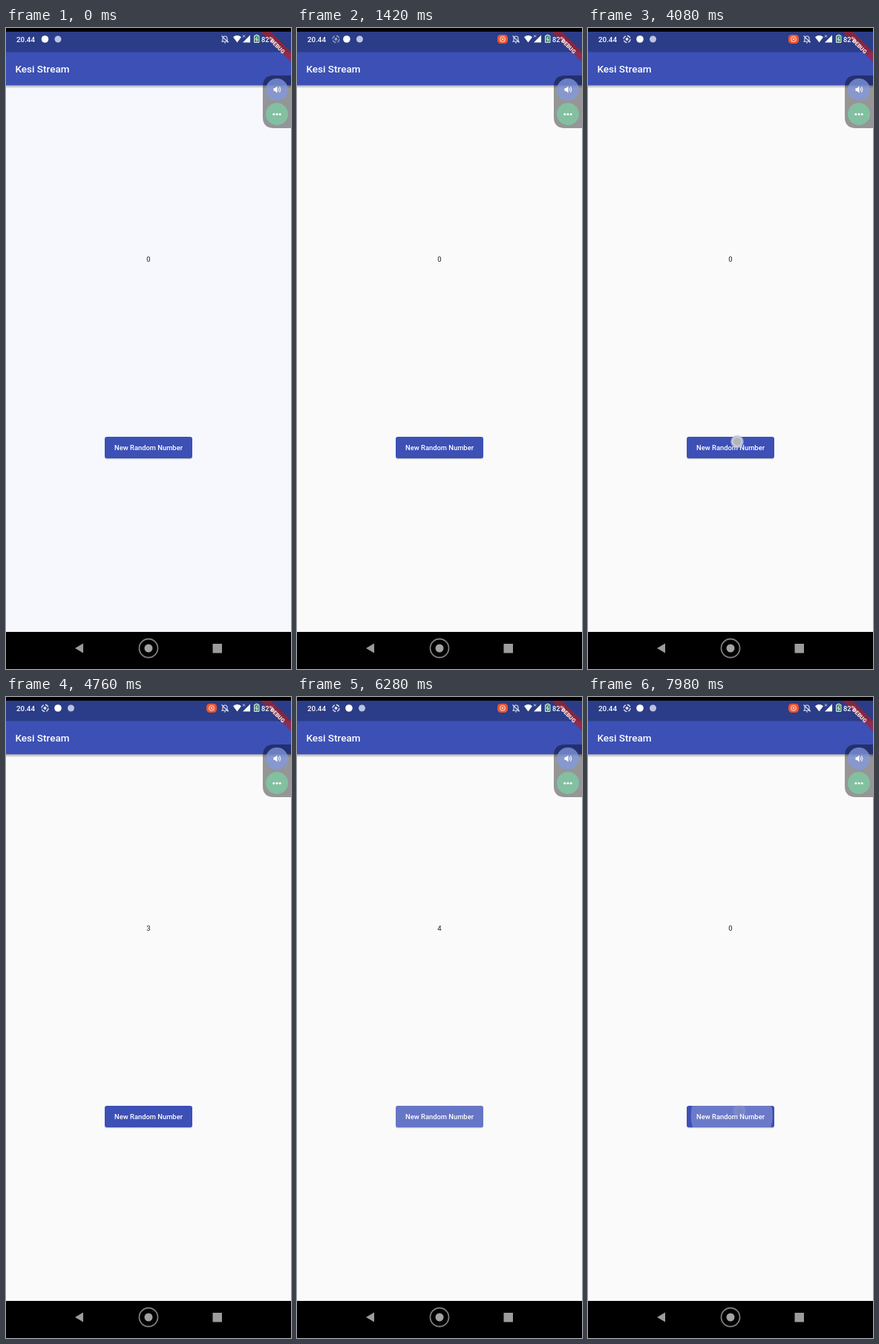
An HTML page that plays this animation: 384x864 px, repeating every 8000 ms.

```html
<!DOCTYPE html>
<html lang="en">
<head>
<meta charset="utf-8">
<title>Random number stream</title>
<style>
  html, body { margin: 0; width: 100%; height: 100%; overflow: hidden; background: #000; }
  svg { display: block; width: 384px; height: 864px; }
  text { font-family: Roboto, sans-serif; font-weight: 500; fill: #fff; }
  .mid { text-anchor: middle; }
</style>
</head>
<body>
<svg viewBox="0 0 384 864">
  <defs>
    <clipPath id="buttonShape"><rect x="133" y="551" width="118" height="29" rx="3"/></clipPath>
    <clipPath id="app"><rect y="5" width="384" height="809"/></clipPath>
    <linearGradient id="shade" x2="0" y2="1">
      <stop stop-opacity=".32"/>
      <stop offset="1" stop-opacity="0"/>
    </linearGradient>
    <radialGradient id="glow">
      <stop offset=".45" stop-color="#b4b5ba"/>
      <stop offset=".75" stop-color="#c9cfdc"/>
      <stop offset="1" stop-color="#aab6d8" stop-opacity=".5"/>
    </radialGradient>
  </defs>

  <rect width="384" height="864"/>
  <rect id="page" y="77" width="384" height="737"/>
  <rect y="77" width="384" height="4.5" fill="url(#shade)"/>
  <rect y="5" width="384" height="28" fill="#2b3d89"/>
  <rect y="32.5" width="384" height="44.7" fill="#3c50b6"/>
  <text x="12.5" y="60" font-size="13.5">Kesi Stream</text>

  <text id="number" class="mid" x="192" y="315" font-size="9.5" style="font-weight:400;fill:#222"></text>

  <rect x="133" y="552.3" width="118" height="29" rx="3" opacity=".2"/>
  <g clip-path="url(#buttonShape)">
    <rect x="133" y="551" width="118" height="29" fill="#3c50b6"/>
    <circle id="ripple" fill="#fff"/>
  </g>
  <text class="mid" x="192" y="569" font-size="9.4">New Random Number</text>
  <circle id="touch" cy="557.5" r="9" fill="url(#glow)"/>

  <g clip-path="url(#app)">
    <path d="M343 5H357L384 32V46Z" fill="#b71c1c" opacity=".63"/>
    <text class="mid" transform="translate(364 26.5) rotate(45)" font-size="7.6" style="font-weight:900;fill:#f4e6e2">DEBUG</text>
  </g>

  <!-- status bar -->
  <text x="14" y="19" font-size="9.8">20.44</text>
  <g id="recorder" fill="none" stroke="#e0e3ee">
    <circle cx="52.5" cy="15" r="4.5" stroke-width="1.3" stroke-dasharray="5 2"/>
    <circle cx="52.5" cy="15" r="2" fill="#e0e3ee" stroke="none"/>
  </g>
  <g id="notices">
    <circle cx="52.5" cy="15" r="4.8" fill="#fff"/>
    <circle cx="70" cy="15" r="4.5" fill="#bcc3e2"/>
  </g>
  <g id="chip">
    <rect x="270" y="9" width="14" height="12" rx="4.5" fill="#ec5532"/>
    <circle cx="277" cy="15" r="3.3" fill="none" stroke="#ffd9cc" stroke-width="1.1"/>
    <circle cx="277" cy="15" r="1.3" fill="#ffd9cc"/>
  </g>
  <g fill="none" stroke="#dfe3f0" stroke-width="1.1">
    <path d="M291 18.3H299L298 17V14Q298 11 295 11T292 14V17ZM294 20H296M290.5 10.5L299.5 19.5"/>
    <path d="M319 9.5L322 12.5M322 9.5L319 12.5" stroke-width=".9"/>
  </g>
  <path d="M306 12.2Q311.5 8 317 12.2L311.5 19.5ZM319 19.5H329V9.5Z" fill="#fff"/>
  <path d="M334.5 10.5H336.3V9.3H339.2V10.5H341V19.5H334.5Z" fill="#3e8b6c" stroke="#dde9ea"/>
  <path d="M338.5 11.5L336.3 15.3H339L337.4 18.4" fill="none" stroke="#fff" stroke-width=".9"/>
  <text x="344" y="19" font-size="9.2">82%</text>

  <!-- floating controls -->
  <path d="M384 64H361Q346 64 346 79V120Q346 135 361 135H384Z" opacity=".4"/>
  <circle cx="365" cy="83" r="15" fill="#8298e2" opacity=".75"/>
  <circle cx="365" cy="116" r="15" fill="#80c4a2" opacity=".9"/>
  <path d="M360.5 81H362.5L365.5 78.5V87.5L362.5 85H360.5Z" fill="#fff"/>
  <path d="M367 80.8Q368.6 83 367 85.2M368.5 79Q371.5 83 368.5 87" fill="none" stroke="#fff"/>
  <g fill="#fff">
    <circle cx="360.8" cy="116.3" r="1.5"/><circle cx="365" cy="116.3" r="1.5"/><circle cx="369.2" cy="116.3" r="1.5"/>
  </g>

  <!-- navigation bar -->
  <path d="M93 836L104 829.5V842.5ZM278.5 830H291V842.5H278.5Z" fill="#9c9c9c"/>
  <circle cx="192" cy="836" r="12.5" fill="none" stroke="#7c7c80" stroke-width="1.8"/>
  <circle cx="192" cy="836" r="5.5" fill="#a3a3a3"/>
</svg>

<script>
const LOOP = 8000;
const DOT_LEAD = 260;      // the finger shows before the button answers
const RIPPLE_RADIUS = 61;
const taps = [
  { start: 4340, x: 201, value: 3 },
  { start: 5160, x: 203, value: 3 },
  { start: 6040, x: 203, value: 4 },
  { start: 6900, x: 203, value: 4 },
  { start: 7840, x: 204, value: 0 }
];
const progress = (t, from, to) => Math.min(1, Math.max(0, (t - from) / (to - from)));
const easeOut = p => 1 - (1 - p) ** 2;
const mix = (a, b, p) => a + (b - a) * p;
const set = (id, attrs) => {
  const el = document.getElementById(id);
  for (const key in attrs) el.setAttribute(key, attrs[key]);
};

function draw(t) {
  set('page', { fill: t < 120 ? '#f6f8fd' : '#fafafa' });
  set('chip', { opacity: progress(t, 200, 560) });

  const slide = progress(t, 1200, 1580);
  set('recorder', { opacity: slide });
  set('notices', { transform: `translate(${mix(0, 17.5, easeOut(slide))} 0)` });

  const touch = taps.findLast(p => t >= p.start - DOT_LEAD);
  set('touch', {
    cx: touch ? touch.x : 0,
    opacity: touch ? 1 - progress(t, touch.start, touch.start + 180) : 0
  });

  const tap = taps.findLast(p => t >= p.start);
  const age = tap ? t - tap.start : 0;
  const grow = easeOut(progress(age, 0, 225));
  set('ripple', {
    cx: mix(tap ? tap.x : 192, 192, grow),
    cy: mix(557.5, 565.5, grow),
    r: RIPPLE_RADIUS * mix(0.3, 1, grow),
    opacity: 0.24 * progress(age, 0, 75) * (1 - progress(age, 225, 375))
  });
  document.getElementById('number').textContent = tap ? tap.value : 0;
}

const begin = performance.now();
function tick() {
  draw((performance.now() - begin) % LOOP);
  requestAnimationFrame(tick);
}
tick();
</script>
</body>
</html>
```
